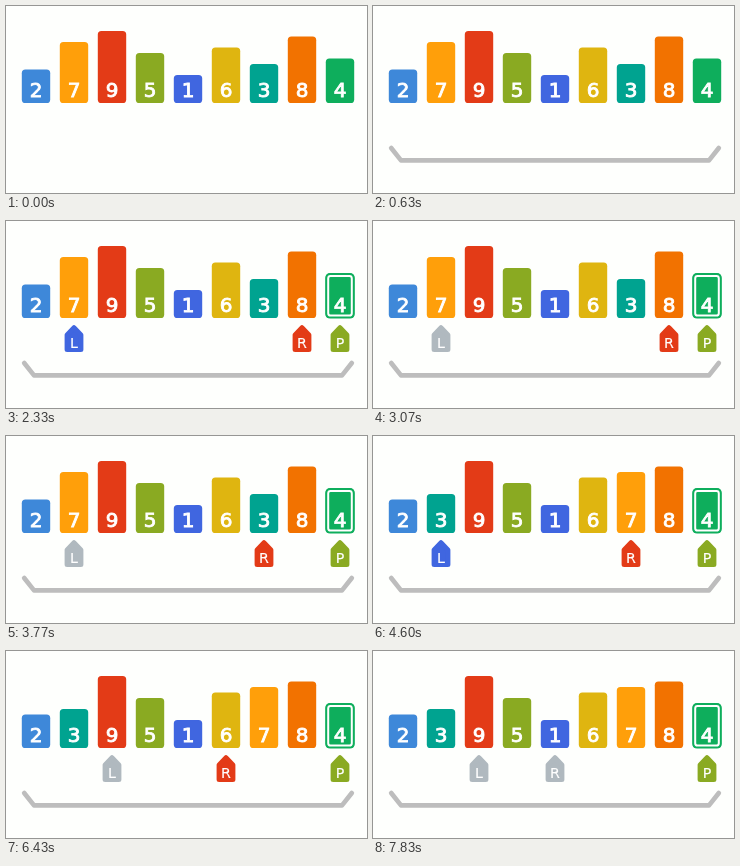
An HTML page for the animation above (8 s loop, 361 by 187 pixels).

```html
<!DOCTYPE html>
<html lang="en">
<head>
<meta charset="utf-8">
<title>Quicksort partition</title>
<style>
html, body { margin: 0; width: 100%; height: 100%; overflow: hidden; background: #fefffd; }
svg { display: block; width: 361px; height: 187px; }
text { fill: #fff; stroke: #fff; text-anchor: middle; font-family: "DejaVu Sans", "Noto Sans", sans-serif; }
.digit { font-size: 20px; stroke-width: .9px; }
.letter { font-size: 14.2px; stroke-width: .2px; }
</style>
</head>
<body>
<svg id="stage" viewBox="0 0 361 187"></svg>
<script>
const LOOP = 8000;
const VALUES = [2, 7, 9, 5, 1, 6, 3, 8, 4];
const COLORS = ['#4066e0', '#3e88d9', '#00a390', '#0eae5c', '#8aaa22',
                '#dfb510', '#ff9f0a', '#f27200', '#e33b17'];
const GREY = [176, 185, 191];
const SLOT = 38;
const stage = document.getElementById('stage');

function add(parent, tag, attrs, text) {
  const el = document.createElementNS('http://www.w3.org/2000/svg', tag);
  for (const key in attrs) el.setAttribute(key, attrs[key]);
  if (text !== undefined) el.textContent = text;
  parent.appendChild(el);
  return el;
}

const slotX = i => 30 + SLOT * i;
const barTop = value => 74.6 - 5.5 * value;
const ease = p => p * p * (3 - 2 * p);

// Value of a track at time t; each step is [start, duration, value].
function track(t, first, steps) {
  let value = first;
  for (const [start, length, to] of steps) {
    const p = Math.min(1, Math.max(0, (t - start) / length));
    value += (to - value) * ease(p);
  }
  return value;
}

const bracket = add(stage, 'path', {
  d: 'M18.2 142L28 154.4H336L345.8 142', fill: 'none', stroke: '#bdbdbd',
  'stroke-width': 4.7, 'stroke-linecap': 'round', 'stroke-linejoin': 'round'
});

function makeBar(value, slot) {
  const g = add(stage, 'g', {});
  const top = barTop(value);
  add(g, 'rect', { x: -14.2, y: top, width: 28.4, height: 97 - top, rx: 3.6, fill: COLORS[value - 1] });
  add(g, 'text', { x: 0, y: 90.7, class: 'digit' }, value);
  return { g, slot, value, moves: [] };
}

const bars = VALUES.map(makeBar);
const barOf = value => bars.find(b => b.value === value);
barOf(7).moves = [[4400, 190, 6]];
barOf(3).moves = [[4400, 190, 1]];

// The pivot's frame: a white inner line and a slightly grown green edge.
const outline = add(barOf(4).g, 'g', { fill: 'none' });
function addRing(inset, color, width, rx) {
  const top = barTop(4) + inset;
  add(outline, 'rect', {
    x: inset - 14.2, y: top, width: 28.4 - 2 * inset, height: 97 - inset - top,
    rx, stroke: color, 'stroke-width': width
  });
}
addRing(0.3, COLORS[3], 1.8, 4);
addRing(2.4, '#fff', 2, 2.4);

function makeMarker(letter, rgb, slot, shown, moves, greys) {
  const g = add(stage, 'g', {});
  const body = add(g, 'path', {
    d: 'M0 106.7L6.9 114V128.6H-6.9V114Z', 'stroke-width': 5, 'stroke-linejoin': 'round'
  });
  add(g, 'text', { x: 0, y: 127.2, class: 'letter' }, letter);
  return { g, body, rgb, slot, shown, moves, greys };
}

const markers = [
  makeMarker('P', [138, 170, 34], 8, 970, [], []),
  makeMarker('L', [64, 102, 224], 0, 1330,
    [[1930, 200, 1], [5070, 200, 2]],
    [[2570, 50, 1], [4400, 50, 0], [5650, 50, 1]]),
  makeMarker('R', [227, 59, 23], 7, 1330,
    [[3170, 200, 6], [6230, 190, 5], [6830, 180, 4]],
    [[3800, 50, 1], [4400, 50, 0], [7450, 50, 1]])
];

function place(item, t) {
  item.g.setAttribute('transform', `translate(${slotX(track(t, item.slot, item.moves))} 0)`);
}

function draw(t) {
  bracket.setAttribute('opacity', track(t, 0, [[30, 300, 1]]));
  outline.setAttribute('opacity', track(t, 0, [[970, 200, 1]]));
  bars.forEach(b => place(b, t));
  for (const m of markers) {
    place(m, t);
    m.g.setAttribute('opacity', track(t, 0, [[m.shown, 200, 1]]));
    const grey = track(t, 0, m.greys);
    const color = `rgb(${m.rgb.map((c, i) => Math.round(c + (GREY[i] - c) * grey))})`;
    m.body.setAttribute('fill', color);
    m.body.setAttribute('stroke', color);
  }
}

const begin = performance.now();
function tick() {
  draw((performance.now() - begin) % LOOP);
  requestAnimationFrame(tick);
}
draw(0);
requestAnimationFrame(tick);
</script>
</body>
</html>
```
